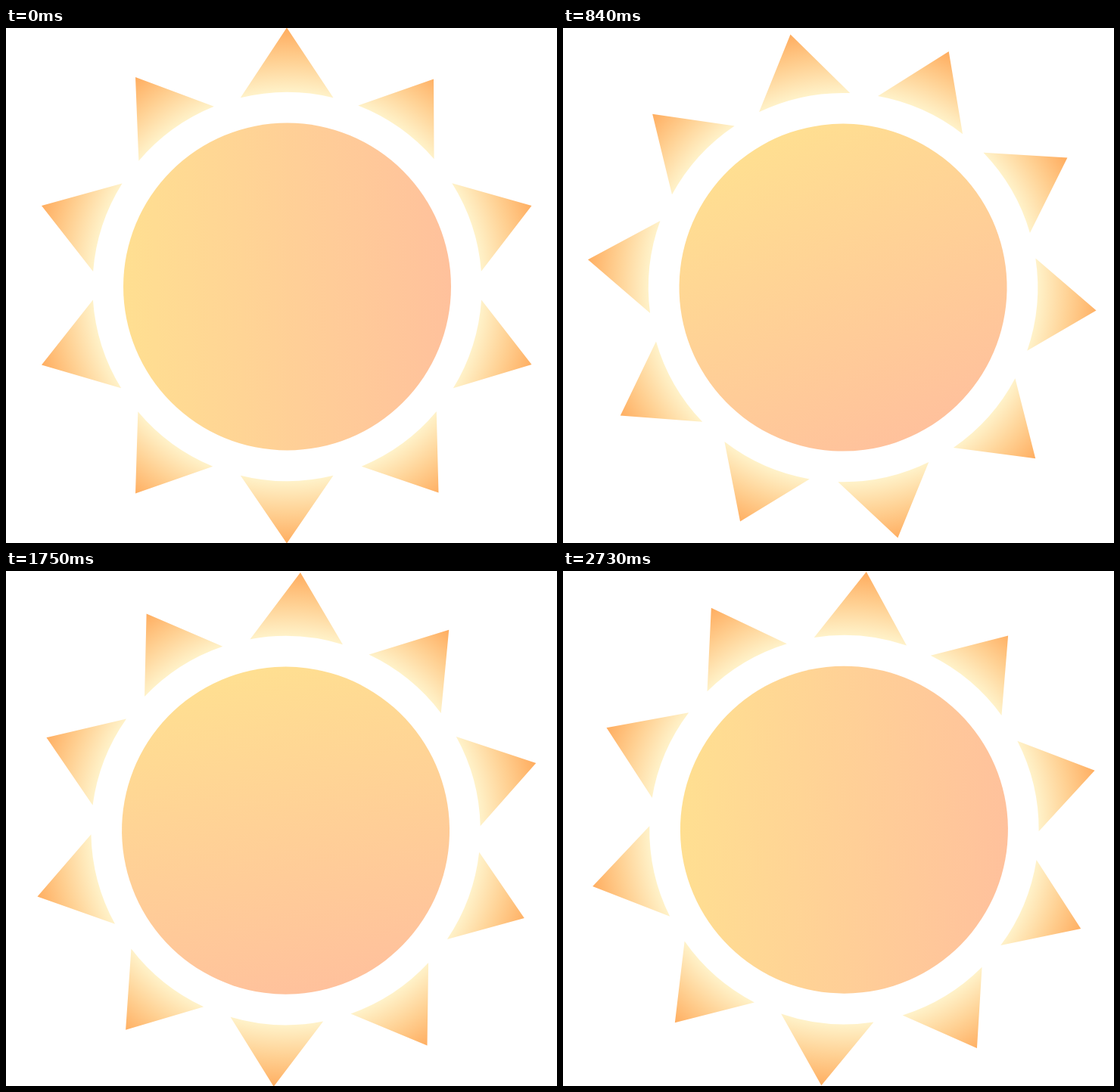
Write an HTML page with a canvas that moves like this. It is 728 by 681 pixels and loops after 2800 ms.

```html
<!DOCTYPE html>
<html lang="en">
<head>
<meta charset="utf-8">
<title>Swinging sun</title>
<style>
  html, body { margin: 0; height: 100%; overflow: hidden; background: #fff; }
  canvas { display: block; }
</style>
</head>
<body>
<canvas width="728" height="681"></canvas>
<script>
const ctx = document.querySelector('canvas').getContext('2d');
const STEP = 70, STEPS = 40, DEGREES = 5;
const pivot = { x: 369.8, y: 341.3 };
const sun = { x: 371.5, y: 342, r: 216.5, rayStart: 257.2 };
const rayHalfWidth = 13.8 * Math.PI / 180;
const rayTips = [
  [371, -0.5], [565, 67.5], [694.5, 235], [694.5, 445], [571.5, 614.5],
  [371, 681.5], [171, 615.5], [47, 445.5], [47, 235], [171, 65]
];

function blend(gradient, ...colors) {
  colors.forEach((color, i) => gradient.addColorStop(i / (colors.length - 1), color));
  return gradient;
}

const discFill = blend(
  ctx.createLinearGradient(sun.x - sun.r, 0, sun.x + sun.r, 0),
  '#ffdf91', '#ffc19c');
const rayFill = blend(
  ctx.createRadialGradient(sun.x, sun.y, sun.rayStart, sun.x, sun.y, 342),
  '#fff2c9', '#ffd092', '#ffac5e');

function drawRay([x, y]) {
  const angle = Math.atan2(y - sun.y, x - sun.x);
  ctx.beginPath();
  ctx.moveTo(x, y);
  ctx.arc(sun.x, sun.y, sun.rayStart, angle - rayHalfWidth, angle + rayHalfWidth);
  ctx.fill();
}

function draw(now) {
  const step = Math.floor(now / STEP) % STEPS;
  const turn = Math.min(step, STEPS - step) * DEGREES * Math.PI / 180;

  ctx.resetTransform();
  ctx.fillStyle = '#fff';
  ctx.fillRect(0, 0, 728, 681);
  ctx.translate(pivot.x, pivot.y);
  ctx.rotate(turn);
  ctx.translate(-pivot.x, -pivot.y);

  ctx.fillStyle = rayFill;
  rayTips.forEach(drawRay);

  ctx.fillStyle = discFill;
  ctx.beginPath();
  ctx.arc(sun.x, sun.y, sun.r, 0, 2 * Math.PI);
  ctx.fill();
}

function loop() {
  draw(performance.now());
  requestAnimationFrame(loop);
}
loop();
</script>
</body>
</html>
```
